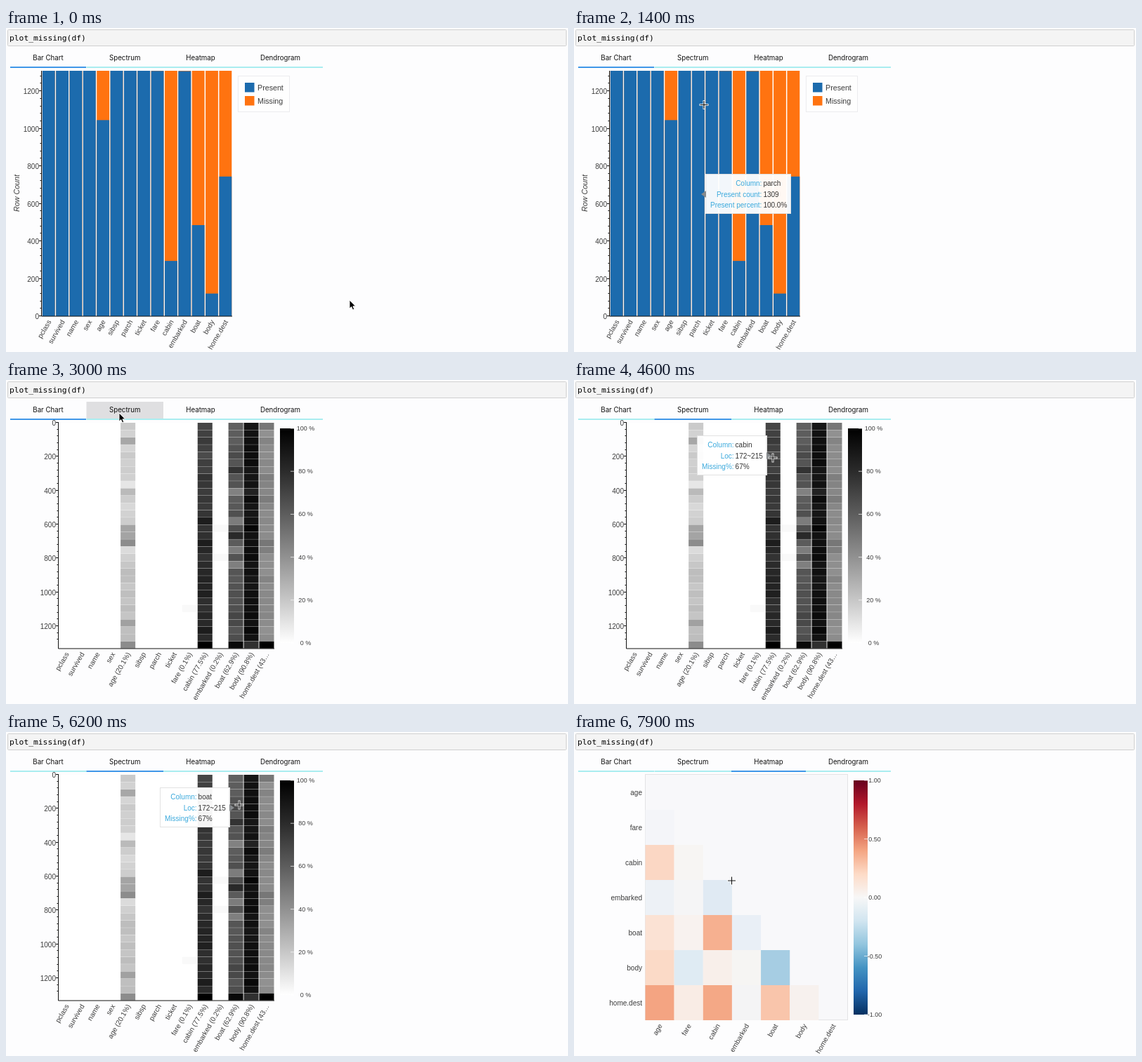
An HTML page that plays this animation: 800 px wide and 462 px high, repeating every 8000 ms.

```html
<!DOCTYPE html>
<html lang="en">
<head>
<meta charset="utf-8">
<title>Missing values</title>
<style>
html, body { margin: 0; width: 100%; height: 100%; overflow: hidden; background: #fdfdfe; }
#stage { position: relative; width: 800px; height: 462px; overflow: hidden; }
svg { position: absolute; left: 0; top: 0; display: block; }
text { font-family: "Liberation Sans", Arial, sans-serif; font-size: 10px; fill: #3c3c3c; }
.code { font-family: "DejaVu Sans Mono", monospace; font-size: 11.3px; fill: #000; }
.tab { font-family: Inter, sans-serif; font-size: 9.7px; fill: #111; text-anchor: middle; }
.big { font-size: 10.7px; }
.small { font-size: 9px; text-anchor: middle; }
.end { text-anchor: end; }
#tip {
  position: absolute; left: 0; top: 0; height: 57px; padding: 5px 5px 0 6px; box-sizing: border-box;
  display: grid; grid-template-columns: auto auto; column-gap: 2px; grid-auto-rows: 15.6px;
  font: 10px/15.6px "Liberation Sans", Arial, sans-serif; white-space: nowrap;
  background: rgba(255, 255, 255, .95); border: 1px solid #e2e2e2; color: #333;
}
#tip b { font-weight: normal; color: #3aa9dc; text-align: right; }
#tip i { position: absolute; top: 23px; border: 5px solid transparent; border-width: 5px 7px; }
#tip.left i { left: 100%; border-left-color: #868a8d; border-right: 0; }
#tip.right i { right: 100%; border-right-color: #868a8d; border-left: 0; }
</style>
</head>
<body>
<div id="stage">
  <svg id="page" width="800" height="462"></svg>
  <div id="tip"></div>
  <svg id="pointer" width="800" height="462">
    <path id="arrow" d="M0 0V12L2.7 9.6L4.6 13.8L6.7 12.9L4.9 8.8H8.6Z" fill="#000" stroke="#fff" stroke-width=".9"/>
    <g id="cross" fill="none">
      <path d="M-6.5 0H6.5M0 -6.5V6.5" stroke="#fff" stroke-opacity=".85" stroke-width="3"/>
      <path d="M-5.5 0H5.5M0 -5.5V5.5" stroke="#111" stroke-width="1.1"/>
    </g>
  </svg>
</div>
<script>
const LOOP = 8000, STEP = 100, TOTAL = 1309, BIN = 43, BINS = 31;
const BLUE = "#1c6bad", ORANGE = "#ff7310";
const $ = id => document.getElementById(id);

const names = ["pclass", "survived", "name", "sex", "age", "sibsp", "parch", "ticket",
  "fare", "cabin", "embarked", "boat", "body", "home.dest"];
const present = { age: 1046, fare: 1308, cabin: 295, embarked: 1307, boat: 486, body: 121, "home.dest": 745 };
const count = name => present[name] ?? TOTAL;

// Percent missing per bin: a level with a slope and some noise, plus the bins that stand out
const spectrum = {
  age: { base: 16, slope: 6, noise: 4, peaks: { 2: 32, 8: 9, 9: 25, 14: 33, 15: 33, 16: 42, 17: 13, 27: 34, 30: 42 } },
  cabin: { base: 73, slope: 11, noise: 4, peaks: { 4: 67, 13: 86, 16: 86, 30: 100 } },
  boat: { base: 63, slope: 3, noise: 4, peaks: { 4: 67, 6: 77, 9: 46, 13: 48, 15: 81, 17: 48, 19: 47, 30: 95 } },
  body: { base: 91, slope: 1, noise: 3, peaks: { 9: 84, 14: 97, 30: 78 } },
  "home.dest": { base: 45, slope: -1, noise: 4, peaks: { 0: 50, 1: 40, 16: 50, 30: 100 } },
  fare: { base: 0, slope: 0, noise: 0, peaks: { 25: 2 } },
  embarked: { base: 0, slope: 0, noise: 0, peaks: { 14: 2, 18: 2 } }
};
const noise = n => {
  const s = Math.sin(n * 12.9898) * 43758.5453;
  return 2 * (s - Math.floor(s)) - 1;
};
function missing(name, bin) {
  const s = spectrum[name];
  if (!s) return 0;
  return s.peaks[bin] ?? Math.round(s.base + s.slope * bin / BINS + s.noise * noise(bin + s.base));
}

const heatNames = ["age", "fare", "cabin", "embarked", "boat", "body", "home.dest"];
const heat = [
  [],
  ["#f4f5f9"],
  ["#fbd7c4", "#f7f5f3"],
  ["#edf1f6", "#f5f5f6", "#e0eaf3"],
  ["#fbe2d4", "#f8f2ef", "#f6b090", "#e9eff6"],
  ["#fbdac7", "#dfebf3", "#f8efea", "#f6f5f3", "#a6cde3"],
  ["#f4a482", "#f9ece5", "#f4a886", "#f4f4f5", "#f9c5ab", "#f7f1ee"]
];
const redBlue = ["#67001f", "#b2182b", "#d6604d", "#f4a582", "#fddbc7", "#f7f7f7",
  "#d1e5f0", "#92c5de", "#4393c3", "#2166ac", "#053061"];

const areas = [
  { x: 51, y: 61, w: 271, h: 350 },
  { x: 75, y: 61, w: 307, h: 322 },
  { x: 101.5, y: 61, w: 288, h: 350 }
];
const tabs = [["Bar Chart", 6, 114], ["Spectrum", 114.5, 224], ["Heatmap", 224, 330], ["Dendrogram", 330, 451]];

// Pointer moves: start, end, then the point reached; it rests in between
const origin = [489, 388];
const moves = [
  [100, 300, 521, 352], [300, 500, 370, 215], [500, 700, 254, 143], [700, 900, 250, 139],
  [1000, 1300, 215, 122], [1300, 1500, 155, 97], [1500, 1900, 137, 83],
  [2400, 2600, 145, 68], [2600, 2900, 161, 47],
  [3500, 3700, 200, 66], [3700, 3900, 262, 87],
  [4300, 4600, 283, 111], [4600, 4800, 320, 128], [4800, 5000, 326, 130],
  [5600, 6200, 332, 104], [6200, 6600, 279, 44],
  [7400, 7600, 262, 80], [7600, 7900, 224.5, 212]
];
const views = [0, 2900, 6700];

const rect = (x, y, w, h, fill, more = "") =>
  `<rect x="${x}" y="${y}" width="${w}" height="${h}" fill="${fill}" ${more}/>`;
const text = (x, y, s, cls = "", more = "") => `<text x="${x}" y="${y}" class="${cls}" ${more}>${s}</text>`;
const line = d => `<path d="${d}" stroke="#111" fill="none"/>`;
const list = (n, fn) => Array.from({ length: n }, (_, i) => fn(i)).join("");
const gray = p => {
  const v = Math.round(255 * (1 - p / 100) ** 1.1);
  return `rgb(${v},${v},${v})`;
};
const percents = Array.from({ length: 6 }, (_, i) => 100 - 20 * i);
const gradient = (id, colors) => `<linearGradient id="${id}" x2="0" y2="1">` +
  colors.map((c, i) => `<stop offset="${i / (colors.length - 1)}" stop-color="${c}"/>`).join("") + "</linearGradient>";

function columnLabels(area, labels) {
  const pitch = area.w / labels.length;
  return labels.map((s, i) =>
    `<text class="end" dy="3.5" transform="translate(${area.x + (i + .5) * pitch + 1} ${area.y + area.h + 6}) rotate(-60)">${s}</text>`
  ).join("");
}

function rowAxis(a, yOf) {
  let d = `M${a.x - .5} ${a.y}V${a.y + a.h}H${a.x + a.w}`, labels = "";
  for (let v = 0; v <= TOTAL; v += 40) {
    const major = v % 200 === 0, y = Math.round(yOf(v)) - .5;
    d += `M${a.x - (major ? 4 : 2.5)} ${y}H${a.x}`;
    if (major) labels += text(a.x - 4, y + 4, v, "end");
  }
  return line(d) + labels;
}

function colorBar(x, h, fill, labels, center) {
  const gap = h / (labels.length - 1);
  return rect(x, 69, 20, h, fill) + labels.map((s, i) => {
    const y = 69 + i * gap;
    return rect(x + 15, y - .5, 5, 1, "#fff", 'opacity=".7"') + text(center, y + 3, s, "small");
  }).join("");
}

function barChart() {
  const a = areas[0], pitch = a.w / names.length;
  const bars = names.map((name, i) => {
    const x = a.x + i * pitch + .8, w = pitch - 1.5, h = a.h * count(name) / TOTAL;
    return rect(x, a.y, w, a.h, ORANGE) + rect(x, a.y + a.h - h, w, h, BLUE);
  }).join("");
  const legend = rect(330.5, 68.5, 73, 51, "#fefefe", 'stroke="#ececee"') +
    rect(340, 78, 13.5, 13.5, BLUE) + text(358, 88.5, "Present", "big") +
    rect(340, 97, 13.5, 13.5, ORANGE) + text(358, 107.5, "Missing", "big");
  const title = text(0, 0, "Row Count", "big", 'font-style="italic" text-anchor="middle" transform="translate(19 235.5) rotate(-90)"');
  return rect(a.x, a.y, a.w, a.h, "#fff") + bars + rowAxis(a, v => a.y + a.h * (1 - v / TOTAL)) +
    columnLabels(a, names) + legend + title;
}

function spectrumChart() {
  const a = areas[1], pitch = a.w / names.length, step = a.h / BINS;
  const cells = names.map((name, i) => list(BINS, j => {
    const p = missing(name, j);
    return p ? rect(a.x + i * pitch + .4, a.y + j * step, pitch - .9, step - .25, gray(p)) : "";
  })).join("");
  const labels = names.map(name => {
    if (name === "home.dest") return "home.dest (43…";
    const p = 100 * (1 - count(name) / TOTAL);
    return p ? `${name} (${p.toFixed(1)}%)` : name;
  });
  return rect(a.x, a.y, a.w, a.h, "#fff") + cells + rowAxis(a, v => a.y + v * a.h / (BIN * BINS)) +
    columnLabels(a, labels) +
    colorBar(390, 306, "url(#grays)", percents.map(v => v + " %"), 426.5);
}

function heatChart() {
  const a = areas[2], w = a.w / 7, h = a.h / 7;
  const cells = heat.map((row, j) =>
    row.map((c, i) => rect(a.x + i * w, a.y + j * h, w, h, c)).join("")).join("");
  return rect(a.x, a.y - .5, a.w, a.h, "#f8f8fa", 'stroke="#e3e3e5"') + cells +
    heatNames.map((s, j) => text(97, a.y + (j + .5) * h + 3.5, s, "end")).join("") +
    columnLabels(a, heatNames) +
    colorBar(398, 334, "url(#redBlue)", ["1.00", "0.50", "0.00", "-0.50", "-1.00"], 428);
}

$("page").innerHTML =
  "<defs>" + gradient("grays", percents.map(gray)) + gradient("redBlue", redBlue) + "</defs>" +
  rect(2.5, 2.5, 795, 23, "#f4f4f4", 'rx="1" stroke="#cfcfcf"') + text(5, 18, "plot_missing(df)", "code") +
  tabs.map(([s, l, r], i) =>
    rect(l, 31, r - l, 24, "#dfdfe1", `id="hover${i}"`) + rect(l, 55, r - l, 2, "#a9edf0") +
    rect(l, 55, r - l, 2, "#3f97e8", `id="line${i}"`) + text((l + r) / 2, 46.3, s, "tab")).join("") +
  [barChart, spectrumChart, heatChart].map((fn, i) => `<g id="view${i}">${fn()}</g>`).join("");

function pointerAt(t) {
  let [x, y] = origin;
  for (const [from, to, nx, ny] of moves) {
    const f = Math.min(1, Math.max(0, (t - from) / (to - from)));
    x += (nx - x) * f;
    y += (ny - y) * f;
  }
  return [x, y];
}

// What the tooltip says and the point it is tied to
function hit(view, x, y) {
  const a = areas[view], pitch = a.w / names.length;
  const i = Math.min(names.length - 1, Math.floor((x - a.x) / pitch)), name = names[i];
  const cx = a.x + (i + .5) * pitch;
  if (view === 0) {
    const n = count(name), split = a.y + a.h * (1 - n / TOTAL), low = y >= split;
    const kind = low ? "Present" : "Missing", amount = low ? n : TOTAL - n;
    const share = n === TOTAL ? "100.0" : (100 * amount / TOTAL).toFixed(2);
    return {
      cx, cy: low ? (split + a.y + a.h) / 2 : (a.y + split) / 2,
      rows: [["Column:", name], [kind + " count:", amount], [kind + " percent:", share + "%"]]
    };
  }
  const step = a.h / BINS, j = Math.floor((y - a.y) / step);
  return {
    cx, cy: a.y + (j + .5) * step,
    rows: [["Column:", name], ["Loc:", `${j * BIN}~${(j + 1) * BIN}`], ["Missing%:", missing(name, j) + "%"]]
  };
}

function showTip(view, x, y) {
  const tip = $("tip"), a = areas[view], { cx, cy, rows } = hit(view, x, y);
  const left = cx > a.x + a.w / 2 - .5;
  tip.className = left ? "left" : "right";
  tip.innerHTML = rows.map(([k, v]) => `<b>${k}</b><span>${v}</span>`).join("") + "<i></i>";
  const at = left ? cx - 8.5 - tip.offsetWidth : cx + 10;
  tip.style.transform = `translate(${Math.round(at)}px, ${Math.round(cy - 28.5)}px)`;
}

function draw(t) {
  const view = views.filter(v => v <= t).length - 1;
  const [x, y] = pointerAt(t), a = areas[view];
  const inside = x >= a.x && x < a.x + a.w && y >= a.y && y < a.y + a.h;
  const fade = view ? Math.min(1, Math.max(0, (t - views[view] - 100) / 400)) : 1;

  for (let i = 0; i < 4; i++) {
    const [, l, r] = tabs[i];
    $("hover" + i).style.display = x >= l && x < r && y >= 31 && y < 56 ? "" : "none";
    $("line" + i).style.opacity = i === view ? fade : i === view - 1 ? 1 - fade : 0;
    if (i < 3) $("view" + i).style.display = i === view ? "" : "none";
  }
  $("arrow").style.display = inside ? "none" : "";
  $("cross").style.display = inside ? "" : "none";
  for (const id of ["arrow", "cross"]) $(id).setAttribute("transform", `translate(${x} ${y})`);

  const tipOn = inside && view < 2;
  $("tip").style.display = tipOn ? "" : "none";
  if (tipOn) showTip(view, x, y);
}

const start = performance.now();
let last = -1;
function tick() {
  const t = Math.floor((performance.now() - start) % LOOP / STEP) * STEP;
  if (t !== last) draw(last = t);
  requestAnimationFrame(tick);
}
tick();
</script>
</body>
</html>
```
